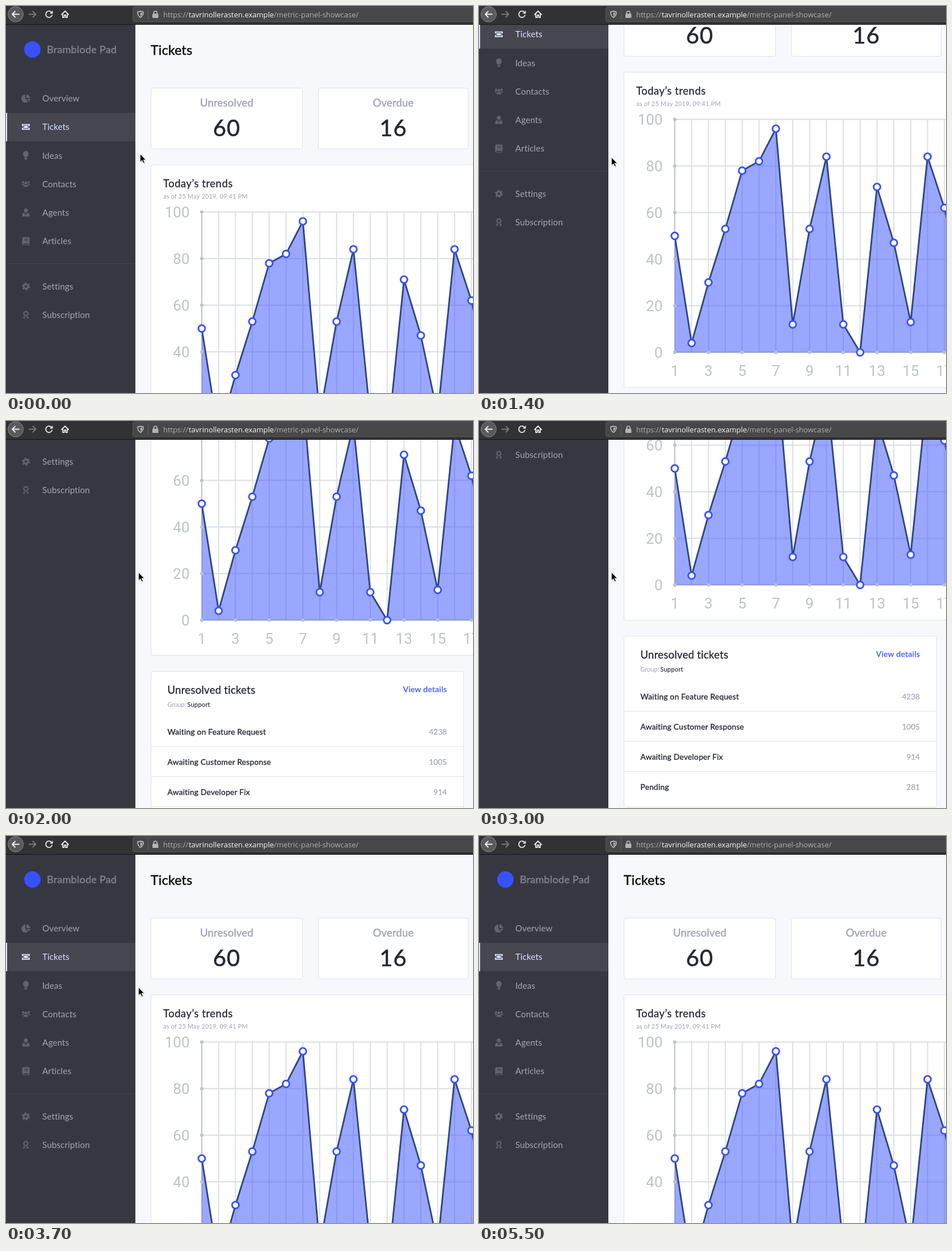
Write an HTML page that moves like this. It is 823 px wide and 681 px high and loops after 6400 ms.

```html
<!DOCTYPE html>
<html lang="en">
<head>
<meta charset="utf-8">
<title>Tickets</title>
<style>
  html, body { margin: 0; width: 100%; height: 100%; overflow: hidden; background: #f7f8fc; }
  svg { display: block; width: 100vw; height: 100vh; }
  text { white-space: pre; }
</style>
</head>
<body>
<svg id="stage" viewBox="0 0 823 681"></svg>
<script>
const LOOP = 6400, STEP = 100;
const BLUE = '#3751ff', INK = '#252733', MUTED = '#9fa2b4', AXIS = '#bdc3c7', GRID = '#dadde1';
const SANS = 'Lato, sans-serif', CHART = 'Roboto, sans-serif', CHROME = "'Open Sans', sans-serif";

// weight adds a thin outline for in-between font weights
function text(x, y, str, size, fill, { font = SANS, spacing = 0, weight = 0, anchor = 'start' } = {}) {
  const outline = weight ? ` stroke="${fill}" stroke-width="${weight}"` : '';
  return `<text x="${x}" y="${y}" font-family="${font}" font-size="${size}" fill="${fill}"` +
    ` letter-spacing="${spacing}" text-anchor="${anchor}"${outline}>${str}</text>`;
}
const rect = (x, y, w, h, fill, extra = '') =>
  `<rect x="${x}" y="${y}" width="${w}" height="${h}" fill="${fill}" ${extra}/>`;
const line = (x1, y1, x2, y2, color, width = 1) =>
  `<path d="M${x1} ${y1}L${x2} ${y2}" stroke="${color}" stroke-width="${width}" fill="none"/>`;
const dot = (x, y, r, fill, extra = '') =>
  `<circle cx="${x}" cy="${y}" r="${r}" fill="${fill}" ${extra}/>`;
const card = (x, y, w, h) => rect(x, y, w, h, '#fff', 'rx="3.5" stroke="#dfe0eb"');
const shape = d => `<path fill-rule="evenodd" d="${d}"/>`;
const range = (n, fn) => Array.from({ length: n }, (_, i) => fn(i)).join('');

const icons = {
  Overview: shape('M-1-6.5A7 7 0 1 0 4 5.5L-1 .5ZM1-7A7 7 0 0 1 7.5-.5H1ZM1.5 1H7.5A7 7 0 0 1 5.3 5Z'),
  Tickets: shape('M-7-5H7V-2A2 2 0 0 0 7 2V5H-7V2A2 2 0 0 0-7-2ZM-4.5-3.2V3.2H4.5V-3.2ZM-3.4-2.2H3.4V2.2H-3.4Z'),
  Ideas: shape('M-5-3A5 5 0 0 1 5-3C5 0 2.5 1 2.5 3.3H-2.5C-2.5 1-5 0-5-3ZM-2.5 4.3H2.5V6L1 7.5H-1L-2.5 6Z'),
  Contacts: dot(-5, -3, 1.9, 'inherit') + dot(5, -3, 1.9, 'inherit') + dot(0, -2, 2.6, 'inherit') +
    shape('M-7.5 2V1Q-7-.5-5-.5T-3 .5L-4.5 2ZM7.5 2V1Q7-.5 5-.5T3 .5L4.5 2ZM-4.3 5V4Q-4 1.3 0 1.3T4.3 4V5Z'),
  Agents: dot(0, -3.8, 3.5, 'inherit') +
    shape('M-6.5 7V4.5Q-6-.2-2.5 .6L-.8 5.5 -.4 2.5 -1.2 1H1.2L.4 2.5 .8 5.5 2.5 .6Q6-.2 6.5 4.5V7Z'),
  Articles: shape('M-4.5-7H6.5V4H5.5V6H6.5V7H-4.5Q-6.5 7-6.5 5V-5Q-6.5-7-4.5-7ZM-3-4V-3H4V-4ZM-3-1.5V-.5H4V-1.5ZM-4.5 4V6H4.5V4Z'),
  Settings: '<g fill="none" stroke="currentColor"><circle r="3.8" stroke-width="3"/>' +
    '<circle r="5.9" stroke-width="2.4" stroke-dasharray="3.09"/></g>',
  Subscription: '<circle cy="-2.5" r="3.6" fill="none" stroke="currentColor" stroke-width="2.2"/>' +
    shape('M-4 2L-1 3.2 -2.5 7 -3.3 5.8 -5 6ZM4 2L1 3.2 2.5 7 3.3 5.8 5 6Z')
};

function navItem(name, y) {
  const active = name === 'Tickets';
  const tint = active ? '#dde2ff' : '#62636e';
  return `<g transform="translate(35 ${y})" fill="${tint}" color="${tint}">` +
    icons[name].replace(/fill="inherit"/g, '') + '</g>' +
    text(64, y + 5.5, name, 15.2, active ? '#dde2ff' : '#a4a6b3', { spacing: 0.1 });
}

function sidebar() {
  const names = Object.keys(icons);
  return rect(0, 0, 228, 1300, '#363740') +
    dot(46.5, 76.5, 14.5, BLUE) +
    text(72, 82.5, 'Bramblode Pad', 18, '#838590', { spacing: 0.25, weight: 0.4 }) +
    rect(0, 188, 228, 50, '#45464f') + rect(0, 188, 2, 50, '#dde2ff') +
    line(0, 453.5, 228, 453.5, '#41424b') +
    names.map((n, i) => navItem(n, i < 6 ? 162.5 + 50.25 * i : 493.5 + 50.25 * (i - 6))).join('');
}

function counter(x, w, label, value) {
  const mid = x + w / 2, opts = { anchor: 'middle', spacing: 0.2, weight: 0.4 };
  return card(x, 144.5, w, 107) +
    text(mid, 177, label, 18.5, MUTED, opts) +
    text(mid, 229, value, 40, INK, { ...opts, spacing: 1, weight: 0.6 });
}

function chart() {
  const values = [50, 4, 30, 53, 78, 82, 96, 12, 53, 84, 12, 0, 71, 47, 13, 84, 62, 30];
  const px = i => +(345 + 29.7 * i).toFixed(1), py = v => +(772.5 - 4.1 * v).toFixed(1);
  const trend = values.map((v, i) => `${px(i)} ${py(v)}`).join('L');
  const last = px(values.length - 1), label = { font: CHART, anchor: 'middle' };
  return card(255.5, 279.5, 800, 555) +
    text(277, 318.5, 'Today’s trends', 18.5, INK, { spacing: 0.5, weight: 0.3 }) +
    text(277, 338.5, 'as of 25 May 2019, 09:41 PM', 11, MUTED, { spacing: 0.2 }) +
    range(values.length, i => line(px(i), py(100), px(i), py(0), GRID, 1.8)) +
    range(6, k => line(345, py(20 * k), last, py(20 * k), GRID, 1.8)) +
    line(345, py(100), 345, py(0), AXIS, 2) + line(345, py(0), last, py(0), AXIS, 2) +
    `<path d="M${trend}L${last} ${py(0)}H345Z" fill="${BLUE}" fill-opacity=".5"/>` +
    range(6, k => dot(345, py(20 * k), 3, AXIS) +
      text(323.5, py(20 * k) + 9.2, 20 * k, 26, AXIS, { font: CHART, anchor: 'end' })) +
    range(9, k => dot(px(2 * k), py(0), 3, AXIS) + text(px(2 * k), 813.5, 2 * k + 1, 26, AXIS, label)) +
    `<path d="M${trend}" fill="none" stroke="#2f4780" stroke-width="2.9"/>` +
    values.map((v, i) => dot(px(i), py(v), 6, '#fff', `stroke="${BLUE}" stroke-width="2.9"`)).join('');
}

function ticketList() {
  const rows = [['Waiting on Feature Request', 4238], ['Awaiting Customer Response', 1005],
    ['Awaiting Developer Fix', 914], ['Pending', 281]];
  return card(255.5, 862.5, 551, 301) +
    text(284.5, 902, 'Unresolved tickets', 18.5, INK, { spacing: 0.28, weight: 0.35 }) +
    text(777, 898.5, 'View details', 14, BLUE, { spacing: 0.25, weight: 0.25, anchor: 'end' }) +
    text(284.5, 925, 'Group:', 11, MUTED) +
    text(319.5, 925, 'Support', 11, INK, { spacing: 0.3, weight: 0.15 }) +
    rows.map(([name, count], i) => {
      const y = 973.5 + 53 * i;
      return text(284.5, y, name, 13.8, INK, { spacing: 0.22, weight: 0.35 }) +
        text(777, y, count, 13.6, MUTED, { anchor: 'end', weight: 0.2 }) +
        (i < 3 ? line(256, 994.5 + 53 * i, 806, 994.5 + 53 * i, '#dfe0eb') : '');
    }).join('');
}

function toolbar() {
  const stroked = (d, color, width) =>
    `<path d="${d}" fill="none" stroke="${color}" stroke-width="${width}" stroke-linecap="round" stroke-linejoin="round"/>`;
  const url = { font: CHROME };
  return rect(0, 0, 823, 33, '#323234') + rect(0, 32, 823, 1, '#161618') +
    dot(17, 14.5, 13.5, '#5a5a5c', 'stroke="#8a8a8c"') +
    stroked('M23 14.5H11M16 9.5L11 14.5L16 19.5', '#f0f0f1', 1.9) +
    stroked('M40.5 14.5H52.5M47.5 9.5L52.5 14.5L47.5 19.5', '#79797b', 1.9) +
    stroked('M80.5 11.5A5.6 5.6 0 1 0 81 16.5', '#e6e6e8', 1.9) +
    '<path d="M82.5 8V13.5H77Z" fill="#e6e6e8"/>' +
    stroked('M98 15L104 9L110 15M100 14.5V20H102.7V16H105.3V20H108V14.5', '#e6e6e8', 1.8) +
    rect(223.5, 1.5, 700, 26, '#474749', 'rx="3" stroke="#58585a"') +
    stroked('M237 9Q239 10.2 242 10.3Q242.4 17 237 20Q231.600 17 232 10.3Q235 10.2 237 9Z', '#c4c4c6', 1.5) +
    '<path d="M237 11.500Q238.500 12.300 240 12.300Q240 16 237 17.800Z" fill="#c4c4c6"/>' +
    line(250.5, 4, 250.5, 25, '#5f5f61') +
    rect(258, 13.5, 10.5, 7.5, '#b4b4b6', 'rx="1.2"') +
    stroked('M260.300 13.500V12A2.950 2.950 0 0 1 266.200 12V13.500', '#b4b4b6', 1.8) +
    text(277, 19.5, 'https://', 13, '#b1b1b3', url) +
    text(322, 19.5, 'tavrinollerasten.example', 13, '#f9f9fa', url) +
    text(472, 19.5, '/metric-panel-showcase/', 13, '#b1b1b3', url);
}

const stage = document.getElementById('stage');
stage.innerHTML =
  rect(0, 0, 823, 681, '#f7f8fc') +
  '<g id="page">' + sidebar() +
  text(255, 86, 'Tickets', 23, '#0a0a0c', { spacing: 0.3, weight: 0.5 }) +
  counter(255.5, 267, 'Unresolved', 60) + counter(550.5, 264, 'Overdue', 16) +
  chart() + ticketList() + '</g>' + toolbar() +
  '<g id="cursor"><path d="M1 1V15.500L4.400 12.500 6.800 17.500 9 16.500 6.600 11.500H11Z" fill="#000" opacity=".18"/>' +
  '<path d="M0 0V14L3.300 11 5.700 16 7.900 15 5.600 10.200H10Z" fill="#000" stroke="#fff" stroke-width=".8"/></g>';
const page = document.getElementById('page'), cursor = document.getElementById('cursor');

// wheel ticks: start, duration, distance
const ticks = [[775, 325, 160], [1373, 330, 164], [1750, 440, 163], [2973, 327, -160], [3450, 250, -327]];
const smooth = p => { p = Math.min(1, Math.max(0, p)); return p * p * (3 - 2 * p); };
const scrollAt = t => Math.round(ticks.reduce((s, [start, span, dist]) => s + dist * smooth((t - start) / span), 0));

// cursor path: time, x, y
const path = [[0, 236.5, 260.5], [300, 233.5, 266.5], [4900, 233.5, 266.5], [5000, 242, 226],
  [5100, 246, 152], [5200, 224, 84], [5300, 160, 36], [5400, 92, 8], [5500, 64, -24]];
function cursorAt(t) {
  const i = path.findIndex(p => p[0] > t);
  if (i < 0) return path[path.length - 1].slice(1);
  const [a, b] = [path[i - 1], path[i]], k = (t - a[0]) / (b[0] - a[0]);
  return [a[1] + (b[1] - a[1]) * k, a[2] + (b[2] - a[2]) * k];
}

function draw(t) {
  const step = Math.floor(t / STEP) * STEP;
  page.setAttribute('transform', `translate(0 ${-scrollAt(step)})`);
  cursor.setAttribute('transform', `translate(${cursorAt(step).join(' ')})`);
}

const begin = performance.now();
function tick() {
  draw((performance.now() - begin) % LOOP);
  requestAnimationFrame(tick);
}
tick();
</script>
</body>
</html>
```
